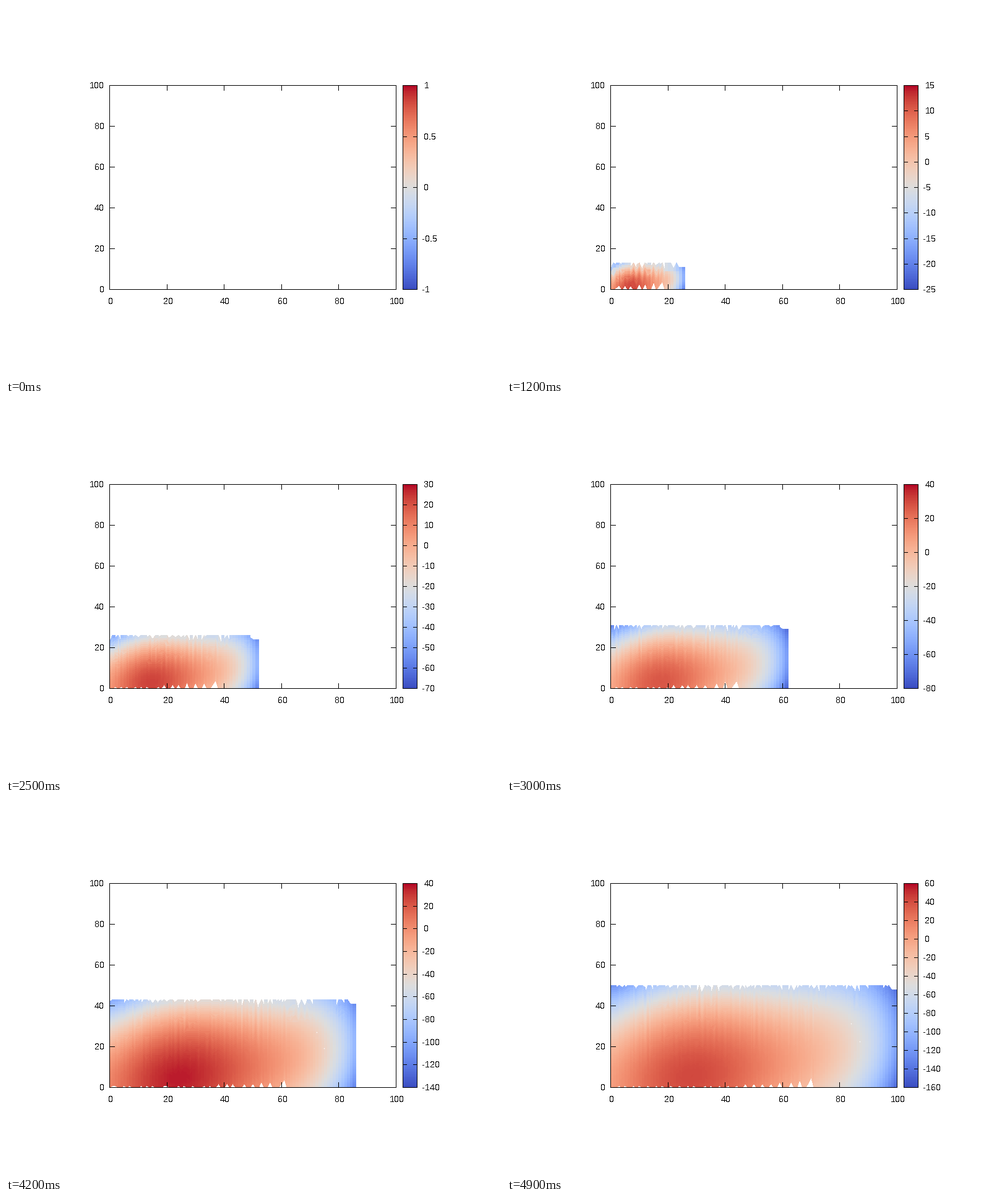
Write a matplotlib script that moves like this. It is 800 by 600 pixels and loops after 5000 ms.

```python
import math

import numpy as np
import matplotlib.pyplot as plt
from matplotlib.animation import FuncAnimation
from matplotlib.collections import LineCollection, PolyCollection

W, H, DPI = 800, 600, 100
FRAMES, INTERVAL = 50, 100
LEFT, RIGHT, TOP, BOTTOM = 167.5, 630.5, 128.5, 458.5
BAR_LEFT, BAR_RIGHT = 641.5, 664.5
PEAK, FLOOR = 41.5, -148.0
CMAP = plt.get_cmap("coolwarm")

plt.rcParams["font.family"] = "Liberation Sans"
plt.rcParams["text.hinting"] = "native"
plt.rcParams["text.hinting_factor"] = 1
FONT_SIZE = 14 * 72 / DPI
LINE_WIDTH = 72 / DPI

# Profile along the bottom edge, as a smooth polynomial through a few heights.
PROFILE = np.polyfit(
    [0, .1, .28, .4, .5, .6, .75, .85, .95, 1],
    [2, 22, 39, 33, 16, -3, -32, -62, -112, -148], 6)


def px(x):
    return LEFT + (RIGHT - LEFT) * np.asarray(x) / 100


def py(y):
    return BOTTOM - (BOTTOM - TOP) * np.asarray(y) / 100


def extremes(n):
    """Lowest and highest value of the field at size n."""
    return FLOOR * (n / 50) ** 1.374, PEAK * (n / 50) ** 0.92


def field(x, y, n):
    u, v = x / (2 * n), y / n
    shape = np.polyval(PROFILE, u) + (10 + 60 * u + 67 * u**2) * v - 137 * v**2
    low, high = extremes(n)
    return high - (PEAK - shape) * (high - low) / (PEAK - FLOOR)


def color_range(n):
    """Range widened to whole ticks, and the tick step."""
    if n == 1:
        return -1.0, 1.0, 0.5
    low, high = extremes(n)
    power = 10 ** math.floor(math.log10(high - low))
    norm = (high - low) / power
    step = power * (0.2 if norm < 2 else 0.5 if norm < 5 else 1)
    return math.floor(low / step) * step, math.ceil(high / step) * step, step


def bottom_teeth(n, rng):
    """First available y of each scan: a row of spikes growing to the right."""
    start = np.zeros(2 * n + 1, int)
    for j in range(40):
        gap = 4.3 * (n / 50) ** 0.25 * j**0.88
        pos = round(1.41 * n - gap + (rng.uniform(-.6, .6) if j else 0))
        if pos < 1:
            break
        height = round(1 + rng.uniform(2.5, 4) * math.exp(-j / 4))
        start[pos] = min(height, n // 3)
        if j == 0:
            start[pos - 1] = start[pos] // 2
    return start


def make_scans(n, rng):
    """Vertical scans with some points missing, which frays the top edge."""
    scans = []
    drop = 0
    for x, first in enumerate(bottom_teeth(n, rng)):
        ys = np.arange(first, n + 1)
        if rng.random() < 0.6:
            drop = rng.choice(6, p=[.2, .2, .22, .2, .13, .05])
        missing = min(drop, n // 3) - first
        if x >= 2 * n - 2:
            ys = ys[:-2]
        elif missing > 0:
            lowest = 1 if x < 1.4 * n else int(0.75 * len(ys))
            inner = np.arange(lowest, len(ys) - 1)
            gone = rng.choice(inner, min(missing, len(inner)), replace=False)
            ys = np.delete(ys, gone)
        scans.append(ys)
    return scans


def make_surface(n):
    rng = np.random.default_rng(700 + n)
    scans = make_scans(n, rng)
    quads, values = [], []
    for x, (a, b) in enumerate(zip(scans, scans[1:])):
        k = min(len(a), len(b))
        if k < 2:
            continue
        ys = np.stack([a[:k - 1], a[1:k], b[1:k], b[:k - 1]], axis=1)
        xs = np.broadcast_to([x, x, x + 1, x + 1], ys.shape)
        quads.append(np.stack([px(xs), py(ys)], axis=2))
        values.append(field(xs, ys, n).mean(axis=1))
    low, high, _ = color_range(n)
    colors = CMAP((np.concatenate(values) - low) / (high - low))
    return PolyCollection(np.concatenate(quads), facecolors=colors,
                          edgecolors="face", linewidths=0.1,
                          antialiaseds=False, snap=False, zorder=1)


def segments(lines):
    """Black one-pixel lines running through pixel centres."""
    return ax.add_collection(LineCollection(
        lines, colors="black", linewidths=LINE_WIDTH, capstyle="projecting",
        antialiaseds=False, snap=False, zorder=3))


def label(x, baseline, text, ha):
    return ax.text(x, baseline, text, ha=ha, va="baseline", fontsize=FONT_SIZE,
                   color="black", antialiased=False, zorder=4)


def box(x0, x1):
    return [[(x0, TOP), (x1, TOP)], [(x0, BOTTOM), (x1, BOTTOM)],
            [(x0, TOP), (x0, BOTTOM)], [(x1, TOP), (x1, BOTTOM)]]


fig = plt.figure(figsize=(W / DPI, H / DPI), dpi=DPI, facecolor="white")
ax = fig.add_axes([0, 0, 1, 1])
gradient = CMAP(np.linspace(1, 0, 256))[:, None, :]
ax.imshow(gradient, extent=(BAR_LEFT - .5, BAR_RIGHT + .5, BOTTOM + .5, TOP - .5),
          aspect="auto", interpolation="nearest", zorder=1)
ax.set_xlim(0, W)
ax.set_ylim(H, 0)
ax.axis("off")

segments(box(LEFT, RIGHT) + box(BAR_LEFT, BAR_RIGHT))
for tick in range(0, 101, 20):
    x, y = math.floor(px(tick)) + 0.5, math.floor(py(tick)) + 0.5
    segments([[(x, BOTTOM), (x, BOTTOM - 8)], [(x, TOP), (x, TOP + 8)],
              [(LEFT, y), (LEFT + 8, y)], [(RIGHT, y), (RIGHT - 8, y)]])
    label(x + 1.5, 482, str(tick), "center")
    label(159, y + 4.5, str(tick), "right")

moving = []


def draw_bar_ticks(n):
    low, high, step = color_range(n)
    lines = []
    for i in range(round((high - low) / step) + 1):
        value = round(low + i * step, 6) + 0.0
        y = BOTTOM - (BOTTOM - TOP) * (value - low) / (high - low)
        y = math.floor(y) + 0.5
        lines += [[(BAR_LEFT, y), (BAR_LEFT + 6, y)],
                  [(BAR_RIGHT, y), (BAR_RIGHT - 6, y)]]
        moving.append(label(672 if value < 0 else 675.5, y + 4.5,
                            f"{value:g}", "left"))
    moving.append(segments(lines))


def update(frame):
    n = frame + 1
    while moving:
        moving.pop().remove()
    draw_bar_ticks(n)
    if n > 1:
        moving.append(ax.add_collection(make_surface(n), autolim=False))
    if n > 40:
        moving.extend(ax.plot(px([1.74 * n, 1.68 * n]), py([.45 * n, .63 * n]), "s",
                              color="white", ms=1, mew=0, zorder=2))
    return moving


anim = FuncAnimation(fig, update, frames=FRAMES, interval=INTERVAL,
                     init_func=lambda: [], repeat=True, repeat_delay=0, blit=False)
plt.show()
```
